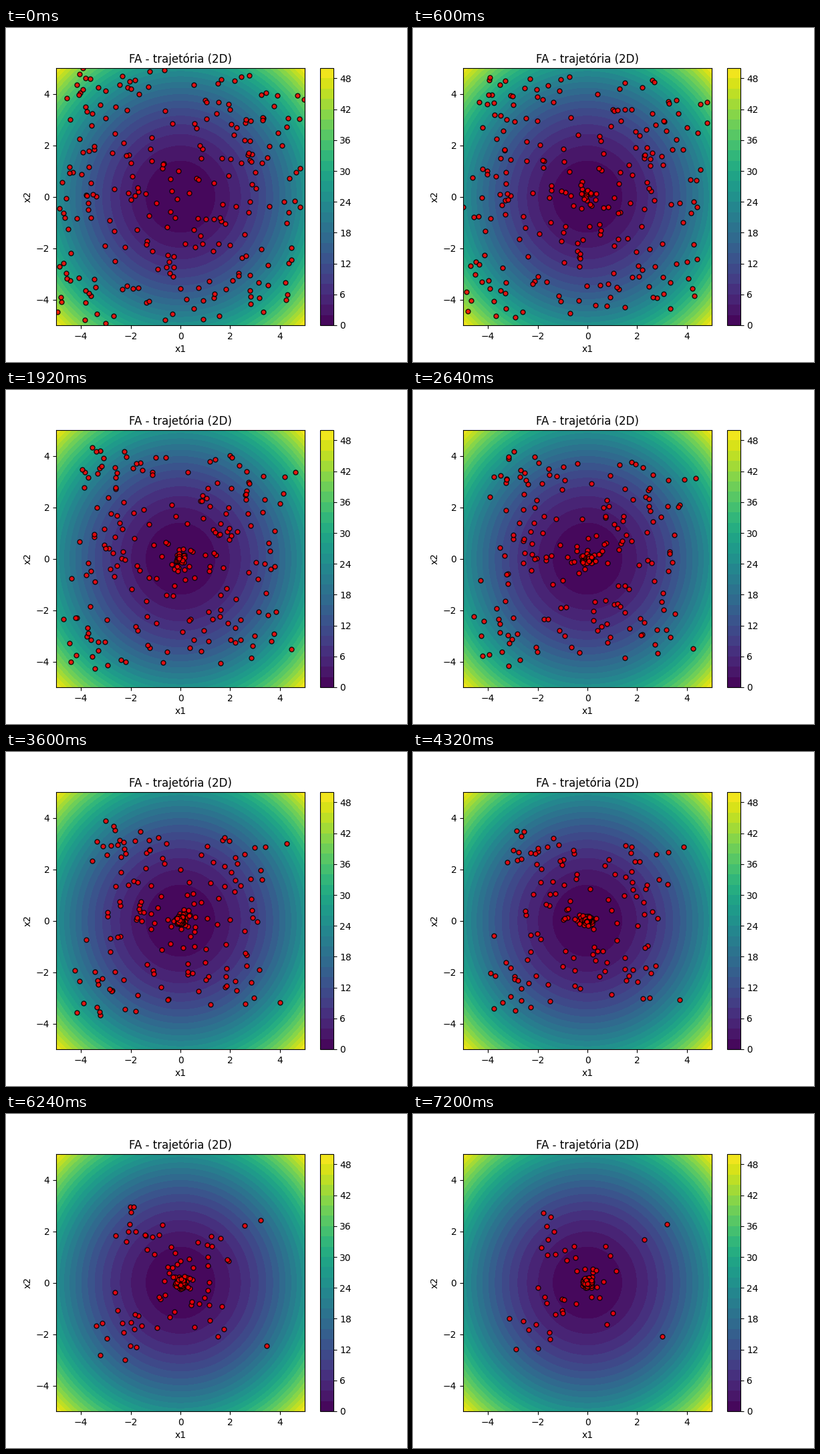
Recreate the animation shown at these times as a matplotlib script. Size 600 px wide and 500 px high, loop 7320 ms.

```python
import numpy as np
import matplotlib.pyplot as plt
from matplotlib.animation import FuncAnimation

FRAMES, INTERVAL = 61, 120
COUNT, LIMIT, NOISE = 250, 5, 0.055
rng = np.random.default_rng(42)


def pull(pos):
    """Inward step: slow far out, faster near the centre, damped inside."""
    r = np.maximum(np.hypot(pos[:, 0], pos[:, 1]), 1e-6)
    speed = np.minimum(0.012 + 0.19 / r, 0.3 * r)
    return -pos * (speed / r)[:, None]


def swarm():
    """Firefly positions for every frame."""
    pos = rng.uniform(-LIMIT, LIMIT, (COUNT, 2))
    path = [pos]
    for _ in range(FRAMES - 1):
        pos = pos + pull(pos) + rng.normal(0, NOISE, pos.shape)
        pos = np.clip(pos, -LIMIT, LIMIT)
        path.append(pos)
    return path


path = swarm()

fig, ax = plt.subplots(figsize=(6, 5), dpi=100)
axis = np.linspace(-LIMIT, LIMIT, 200)
x, y = np.meshgrid(axis, axis)
field = ax.contourf(x, y, x**2 + y**2, levels=np.arange(0, 51, 2), cmap="viridis")
fig.colorbar(field, ax=ax, ticks=np.arange(0, 49, 6))
dots = ax.scatter(*path[0].T, s=25, c="red", edgecolors="black",
                  linewidths=1, alpha=0.85)
ax.set(xlim=(-LIMIT, LIMIT), ylim=(-LIMIT, LIMIT), xlabel="x1", ylabel="x2",
       title="FA - trajetória (2D)")


def draw(i):
    dots.set_offsets(path[i])
    return dots,


anim = FuncAnimation(fig, draw, frames=FRAMES, interval=INTERVAL, repeat=True)
plt.show()
```
